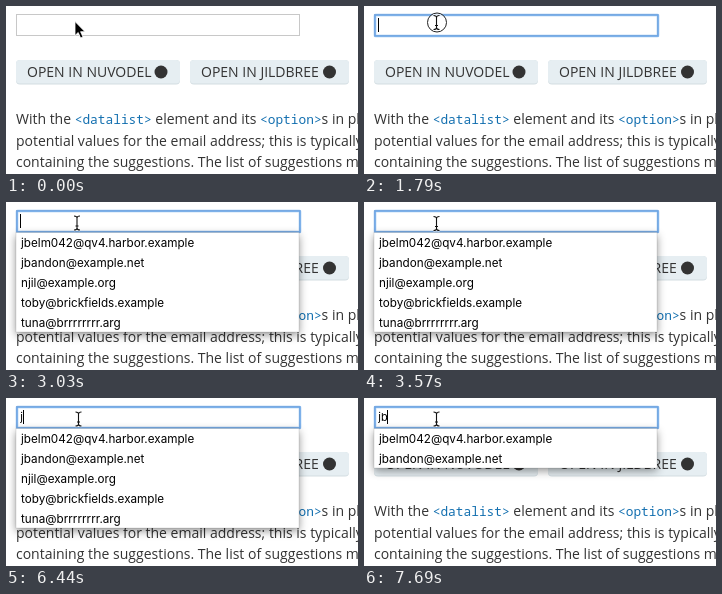
These frames come from a looping animation (352x168 px, 8000 ms). An HTML page:

```html
<!DOCTYPE html>
<html lang="en">
<head>
<meta charset="utf-8">
<title>Datalist suggestions</title>
<style>
  html, body { margin: 0; width: 100%; height: 100%; overflow: hidden; background: #fff; }
  svg { display: block; }
  text { font: 14px "Open Sans", sans-serif; fill: #333; white-space: pre; }
  .code { font: 500 12.83px "Noto Sans Mono", monospace; fill: #1470b0; }
  #options text { font: 11.7px Inter, sans-serif; fill: #000; }
  #typed { font: 11px Inter, sans-serif; fill: #000; }
  #panel { filter: drop-shadow(0 3px 4px rgba(0, 0, 0, .42)); }
</style>
</head>
<body>
<svg width="352" height="168" viewBox="0 0 352 168">
  <g id="buttons"></g>
  <text x="10" y="118">With the <tspan class="code">&lt;datalist&gt;</tspan> element and its <tspan class="code">&lt;option&gt;</tspan>s in place</text>
  <text x="10" y="140">potential values for the email address; this is typically</text>
  <text x="10" y="161">containing the suggestions. The list of suggestions may</text>

  <rect id="field" x="10.5" y="8.5" width="283" height="21" fill="#fff" stroke="#c8c8c8"/>
  <g id="ring" fill="none" stroke="#6ba5e7">
    <rect x="11" y="9" width="283" height="21" rx="1" stroke-width="3" opacity=".35"/>
    <rect x="11" y="9" width="283" height="21" stroke-width="1.6"/>
  </g>
  <g id="options">
    <rect id="panel" x="10" y="30.5" width="283" fill="#fff" stroke="#000" stroke-opacity=".18" stroke-width=".6"/>
  </g>
  <text id="typed" x="14.3" y="23"></text>
  <rect id="caret" y="12" width="1" height="14"/>

  <circle id="press" r="9.5" fill="#fff" fill-opacity=".7" stroke="#222"/>
  <path id="arrow" d="M69 15.500v14l3.200-3 2.400 5.500 2.400-1-2.400-5.300h4.400z" stroke="#fff" stroke-width=".8"/>
  <g id="beam" fill="none">
    <path d="M-3-7Q0-7 0-5Q0-7 3-7M0-5V5M-3 7Q0 7 0 5Q0 7 3 7M-1.500 3H1.500" stroke="#fff" stroke-width="2.400" opacity=".8"/>
    <path d="M-3-7Q0-7 0-5Q0-7 3-7M0-5V5M-3 7Q0 7 0 5Q0 7 3 7M-1.500 3H1.500" stroke="#111" stroke-width="1.100"/>
  </g>
</svg>
<script>
const LOOP = 8000;
const $ = id => document.getElementById(id);
const show = (id, on) => $(id).setAttribute("visibility", on ? "visible" : "hidden");

const button = (x, width, label, iconX) => `
  <rect x="${x}" y="54" width="${width}" height="24.500" rx="4" fill="#d3dde2"/>
  <rect x="${x}" y="54" width="${width}" height="23.500" rx="4" fill="#e6eef2"/>
  <text x="${x + 11}" y="71">${label}</text>
  <circle cx="${iconX}" cy="66" r="6.500" fill="#333"/>`;
$("buttons").innerHTML =
  button(10, 164, "OPEN IN NUVODEL", 155) + button(184, 159, "OPEN IN JILDBREE", 323.5);

const emails = [
  "jbelm042@qv4.harbor.example",
  "jbandon@example.net",
  "njil@example.org",
  "toby@brickfields.example",
  "tuna@brrrrrrrr.arg",
];
$("options").insertAdjacentHTML("beforeend",
  emails.map((email, i) => `<text x="15" y="${45 + 20 * i}">${email}</text>`).join(""));
const rows = [...$("options").querySelectorAll("text")];

const caretToggles = [270, 900, 1430, 2410, 3030, 3570, 4100, 4730, 5270, 5810, 6440, 6980, 7600];

// time, x, y of the text pointer
const pointer = [
  [270, 72, 15.5], [720, 72, 16], [810, 72.5, 16.5], [1870, 72.3, 19.3],
  [2680, 71, 21], [3210, 72, 21.2], [3300, 72.5, 21.5], [6440, 72.5, 21],
];

function draw(t) {
  const focused = t >= 270;
  const pressed = (t >= 270 && t < 360) || (t >= 1790 && t < 1870);
  const open = t >= 1870;
  const typed = t < 6440 ? "" : t < 7690 ? "j" : "jb";
  const filter = t < 6530 ? "" : typed;

  show("ring", focused);
  show("arrow", !focused);
  show("beam", focused);
  show("press", pressed);

  const [, x, y] = pointer.findLast(p => p[0] <= t) || pointer[0];
  $("beam").setAttribute("transform", `translate(${x} ${y})`);
  $("press").setAttribute("transform", `translate(${x + .5} ${y})`);

  $("typed").textContent = typed;
  $("caret").setAttribute("x", [14, 17, 23][typed.length]);
  show("caret", caretToggles.filter(time => time <= t).length % 2);

  let count = 0;
  emails.forEach((email, i) => {
    const match = email.startsWith(filter);
    count += match;
    rows[i].setAttribute("visibility", open && match ? "visible" : "hidden");
  });
  $("panel").setAttribute("height", 20 * count - .5);
  show("panel", open);
}

function tick() {
  draw(performance.now() % LOOP);
  requestAnimationFrame(tick);
}
tick();
</script>
</body>
</html>
```
